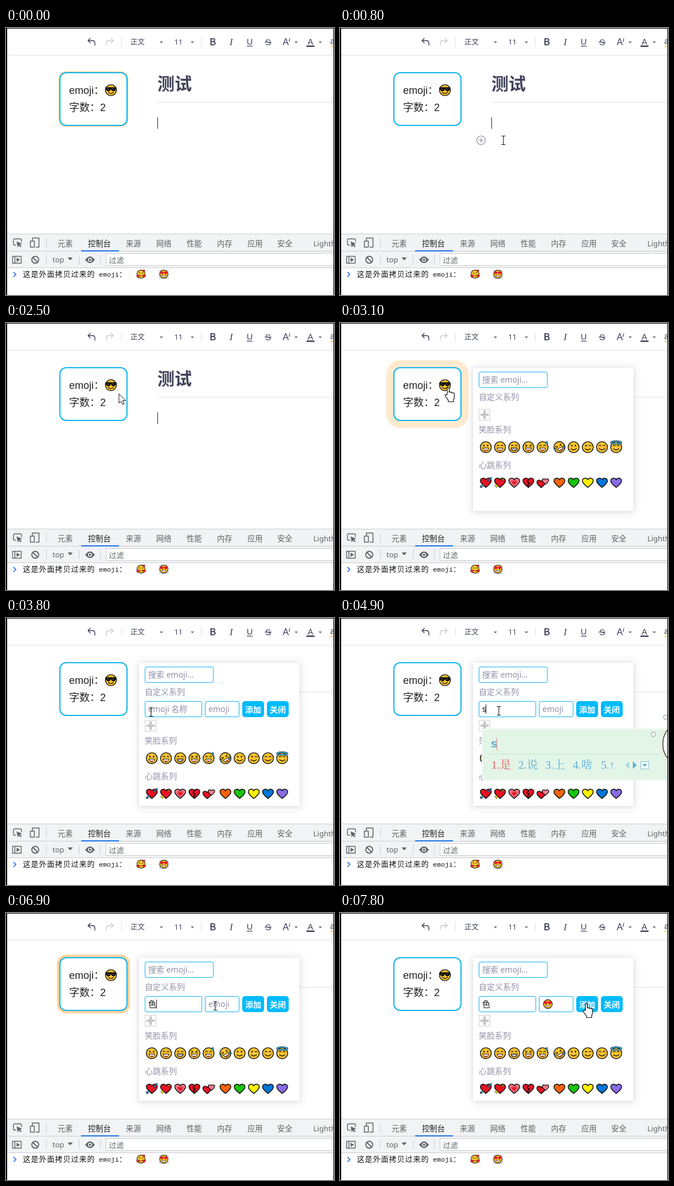
An HTML page for the animation above (8 s loop, 572 by 466 pixels).

```html
<!DOCTYPE html>
<html lang="zh-CN">
<head>
<meta charset="utf-8">
<title>emoji 测试</title>
<style>
html, body { margin: 0; width: 100%; height: 100%; overflow: hidden; background: #fff; }
svg { display: block; width: 572px; height: 466px; }
text { font-family: "Noto Sans", "Noto Sans CJK SC", "Noto Sans CJK", sans-serif; white-space: pre; }
.ar { font-family: "Liberation Sans", "Noto Sans CJK SC", "Noto Sans CJK", sans-serif; }
.mono { font-family: "Liberation Mono", monospace; }
.ser { font-family: "Liberation Serif", "Noto Serif CJK SC", "Noto Sans CJK SC", "Noto Sans CJK", serif; }
.b { font-weight: 700; }
</style>
</head>
<body>
<svg id="stage" viewBox="0 0 572 466"></svg>
<script>
const LOOP = 8000, STEP = 100;
const stage = document.getElementById('stage');

const text = (x, y, size, str, fill = '#222', cls = '', more = '') =>
  `<text x="${x}" y="${y}" font-size="${size}" fill="${fill}" class="${cls}" ${more}>${str}</text>`;
const rect = (x, y, w, h, fill, more = '') =>
  `<rect x="${x}" y="${y}" width="${w}" height="${h}" fill="${fill}" ${more}/>`;
const path = (d, stroke, width = 1.2, fill = 'none') =>
  `<path d="${d}" fill="${fill}" stroke="${stroke}" stroke-width="${width}" stroke-linejoin="round" stroke-linecap="round"/>`;
const dot = (x, y, rx, ry = rx, fill = '#111') =>
  `<ellipse cx="${x}" cy="${y}" rx="${rx}" ry="${ry}" fill="${fill}"/>`;
const use = (id, x, y, s = 1) => `<use href="#${id}" transform="translate(${x} ${y}) scale(${s})"/>`;
const group = (id, body, more = '') => `<g id="${id}" ${more}>${body}</g>`;
const down = (x, y, w, fill) => `<path d="M${x - w} ${y}h${2 * w}l${-w} ${w * 1.1}z" fill="${fill}"/>`;

// Emoji parts, drawn around 0,0
const HEART = 'M0 8.6C-4 5-9.4 1.6-9.4-3C-9.4-8-2.6-9.4 0-4.8C2.6-9.4 9.4-8 9.4-3C9.4 1.6 4 5 0 8.6Z';
const heart = (fill, x = 0, y = 0, s = 1, line = 1.5) =>
  `<g transform="translate(${x} ${y}) scale(${s})">${path(HEART, '#111', line, fill)}</g>`;
const ball = `<circle r="9.6" fill="#ffc52e" stroke="#111" stroke-width="1.4"/>`;
const eyes = dot(-3.2, -2.8, 1.2, 1.7) + dot(3.2, -2.8, 1.2, 1.7);
const arcs = path('M-5.2-2.2q1.7-2.8 3.4 0M1.8-2.2q1.7-2.8 3.4 0', '#111', 1.2);
const squint = path('M-5.4-4.2l3.2 1.700l-3.2 1.700M5.4-4.2l-3.2 1.700l3.2 1.700', '#111', 1.1);
const open = path('M-5 1.500h10q-.6 5-5 5t-5-5z', '#111', 1, '#fff') +
  path('M-2.600 5q2.600-1.600 5.200 0q-2.600 1.600-5.200 0z', '#d8382f', .5, '#d8382f');
const teeth = path('M-5.4 1.400h10.800q-.6 4.800-5.400 4.800t-5.400-4.800z', '#111', 1.1, '#fff') + path('M-4.6 3.7h9.200', '#111', .6);
const smile = path('M-4.8 2.6q4.8 4.4 9.6 0', '#111', 1.2);
const drop = (x, y) => path(`M${x} ${y}q-3.4 4.6 0 5.2q3.4-.6 0-5.2z`, '#111', .7, '#35b3f2');
const blush = dot(-6, 1.6, 1.8, 1.3, '#f58a55') + dot(6, 1.6, 1.8, 1.3, '#f58a55');
const red = '#e81224';

const emoji = {
  grin: ball + eyes + open,
  happy: ball + arcs + open,
  beam: ball + arcs + teeth,
  laugh: ball + squint + open,
  sweat: ball + arcs + open + drop(7.4, -10.5),
  rofl: `<g transform="rotate(-28)">${ball + squint + open}</g>` + drop(-7.4, 1) + drop(7.6, -3),
  mild: ball + eyes + smile,
  wink: ball + dot(-3.2, -2.8, 1.2, 1.7) + path('M1.8-2.4q2-1.6 4 0', '#111', 1.2) + smile,
  shy: ball + blush + arcs + smile,
  halo: ball + arcs + smile + `<ellipse cy="-8" rx="9" ry="2.2" fill="none" stroke="#111" stroke-width="2.8"/>
    <ellipse cy="-8" rx="9" ry="2.2" fill="none" stroke="#39b5ee" stroke-width="1.6"/>`,
  cool: ball + path('M-9-4.6h18l-1 4q-1.2 2.6-4.4 2.2q-2.6-.4-3-3.6h-1.2q-.4 3.2-3 3.6q-3.2.4-4.4-2.2z', '#111', 1, '#111') +
    path('M-6.4-3.2l2 2M2.4-3.2l2 2', '#8a8a8a', .9) + path('M-4.4 4q4.400 3.600 8.800 0', '#111', 1.3),
  adore: ball + arcs + blush + smile + heart(red, -7.4, 5.4, .36, 1) +
    heart(red, 7.4, 5, .38, 1) + heart(red, 6.4, -7.6, .34, 1),
  love: ball + heart(red, -4.4, -2.8, .44, 0) + heart(red, 4.4, -2.8, .44, 0) +
    path('M-4.4 2.600h8.800q-.8 4-4.400 4t-4.400-4z', '#111', .8, '#fff'),
  arrow: heart(red) + path('M-8.600 7.600L-4 3.600M4-3L8.600-7.600', '#111', 2.4) + path('M-8.600 7.600L-4 3.600M4-3L8.600-7.600', '#35b3f2', 1.2) +
    path('M9.600-8.800l-4 .9l3 3zM-9.600 8.600l.4-3.600l2.900 3.200z', '#111', .7, '#35b3f2'),
  spark: heart(red) + path('M-6 2l1.100 2.500l2.500 1.100l-2.500 1.100l-1.100 2.500l-1.100-2.500l-2.500-1.100l2.500-1.100zM5-7.600l.7 1.700l1.700.7l-1.700.7l-.7 1.700l-.7-1.700l-1.700-.7l1.700-.7z', '#111', .5, '#ffd21f'),
  grow: heart('#f4828f') + heart('#ee5265', 0, .2, .68, 0) + heart(red, 0, .4, .36, 0),
  broken: heart(red) + path('M0-5l-2.2 3.6l4 2.4l-3 3.2l1.2 4.2', '#111', 1.7),
  pair: heart(red, -2.4, 2, .8, 1.8) + heart('#f4828f', 5, -2, .6, 2.2),
  orange: heart('#f7630c'), green: heart('#16c60c'), yellow: heart('#fff100'),
  blue: heart('#0078d7'), purple: heart('#886ce4')
};
const faceRow = ['grin', 'happy', 'beam', 'laugh', 'sweat', 'rofl', 'mild', 'wink', 'shy', 'halo'];
const heartRow = ['arrow', 'spark', 'grow', 'broken', 'pair', 'orange', 'green', 'yellow', 'blue', 'purple'];
const row = (names, y) => names.map((n, i) => use(n, 254.3 + i * 24.75 + (i > 4 ? 4.6 : 0), y)).join('');

function toolbar() {
  const ink = '#3c4056', arrows = [271, 325, 506, 548].map(x => down(x, 23.5, 3, '#6d7080')).join('');
  const firm = `stroke="${ink}" stroke-width=".4"`;
  return rect(2, 47, 570, 1, '#e1e2e6') +
    path('M147 18l-4 4l4 4M143.500 22h7.500q4 0 4 4.500v3.500', ink, 1.4) +
    path('M183 18l4 4l-4 4M186.500 22h-7.500q-4 0-4 4.500v3.500', '#c9cad0', 1.4) +
    rect(201, 16, 1, 16, '#dedfe3') + rect(340, 16, 1, 16, '#dedfe3') + arrows +
    text(217, 29, 12.5, '正文', ink) + text(293.5, 29, 12.5, '11', ink) +
    text(355.5, 30, 16, 'B', ink, 'ar', firm) + text(390, 30, 16.5, 'I', ink, 'ser', 'font-style="italic"') +
    text(419.8, 28.5, 14.5, 'U', ink, 'ar') + rect(420, 31, 10, 1.2, ink) +
    text(452, 30, 15.5, 'S', ink, 'ar') + rect(451, 24, 12, 1.2, ink) +
    text(482.5, 30, 16, 'A', ink, 'ar') + text(493, 24, 9, 'i', ink, 'ar b', 'font-style="italic"') +
    text(526, 28.5, 14.5, 'A', ink, 'ar') + rect(524, 30.5, 14, 2.5, ink) +
    text(565.5, 28, 14, 'a', ink, 'ar') + rect(565, 30.5, 7, 3, '#ffd9a8');
}

function devtools() {
  const grey = '#5f6368', line = '#cacdd1';
  const tabs = ['元素', '控制台', '来源', '网络', '性能', '内存', '应用', '安全'];
  const tabX = [90, 143, 209, 262, 315, 368, 421, 473];
  return rect(1, 359, 571, 60, '#f1f3f4') +
    [359, 389, 418].map(y => rect(1, y, 571, 1, line)).join('') +
    path('M17 379h-2q-2 0-2-2v-7q0-2 2-2h10q2 0 2 2v3', grey, 1.4) +
    path('M19 373l8.500 3.400l-3.600 1.400l3 3.200l-1.400 1.300l-3-3.200l-1.700 3z', grey, .6, grey) +
    path('M46 371v-4.500h11.500v16h-5M42.500 372h7v10.500h-7z', grey, 1.5) +
    rect(70, 367, 1, 16, line) +
    tabs.map((s, i) => text(tabX[i], 380.5, 13.3, s, i == 1 ? '#202124' : grey)).join('') +
    text(536, 380.5, 13, 'Lighthouse', grey) + rect(131, 388, 66, 2, '#1a73e8') +
    path('M11.500 398.500h15v12h-15zM15.500 398.500v12', grey, 1.4) + path('M19 401.500l5 3l-5 3z', grey, .6, grey) +
    `<circle cx="51" cy="404.500" r="6" fill="none" stroke="${grey}" stroke-width="1.8"/>` + path('M47 400.500l8 8', grey, 1.8) +
    [70, 127, 164].map(x => rect(x, 396, 1, 16, line)).join('') +
    text(81, 409, 13, 'top', grey) + down(112, 400.5, 4.5, grey) +
    path('M138.500 404.500q8-11 16 0q-8 11-16 0z', grey, 1, grey) + dot(146.5, 404.5, 3.6, 3.6, '#f1f3f4') + dot(146.5, 404.5, 2, 2, grey) +
    rect(174.5, 393.5, 410, 21, '#fff', `stroke="${line}"`) + text(179.5, 409.5, 13, '过滤', grey) +
    path('M13.500 426.500l3.800 3.700l-3.800 3.700', '#367cf1', 1.8) +
    text(29.5, 433.8, 13, '这是外面拷贝过来的', '#111', '', 'letter-spacing="1"') +
    text(162, 433.5, 11.67, 'emoji', '#111', 'mono') + text(197, 433.8, 13, '：', '#111') +
    use('adore', 235.5, 429.5, .74) + rect(267, 422, 17, 16, '#dcdce0', 'id="mark"') + use('love', 275.2, 429.5, .74);
}

const hint = '#9091a8', cyan = '#12b5f0';
const field = (x, y, w) => rect(x + .5, y + .5, w - 1, 27, '#fff', `rx="2.500" stroke="${cyan}"`);
const button = (x, s) => rect(x, 145, 38, 28, '#00bbfd', 'rx="5"') + text(x + 5, 164.5, 14, s, '#fff', 'b');

function panel() {
  const form = field(242, 145, 100) + field(347, 145, 60) + button(412, '添加') + button(455, '关闭') +
    text(248, 164, 14, 'emoji 名称', hint, '', 'id="nameHint"') + text(248, 164, 14, '', '#111', '', 'id="name"') +
    text(353, 164, 14, 'emoji', hint, '', 'id="iconHint"') + group('icon', use('love', 362.5, 159, .8)) +
    rect(0, 151, 1, 16, '#111', 'id="caret"');
  const list = rect(242.5, 150.5, 19, 19, '#fff', 'stroke="#cfcfcf"') +
    rect(245, 158, 14.5, 4, '#c6c6c6') + rect(250, 152.5, 4.5, 15, '#c6c6c6') +
    text(242, 191, 14, '笑脸系列', hint) + row(faceRow, 216.7) +
    text(242, 253, 14, '心跳系列', hint) + row(heartRow, 278.4);
  return rect(219, 66, 306, 276, '#000', 'rx="22" opacity=".012"') +
    `<rect x="232" y="78" width="280" height="250" fill="#fff" style="filter:drop-shadow(0 1px 4px rgba(0,0,0,.16))"/>` +
    field(242, 85, 120) + text(248, 104, 14, '搜索 emoji...', hint) +
    text(242, 134, 14, '自定义系列', hint) + group('form', form) + group('list', list);
}

function ime() {
  const blue = '#5cacd4', xs = [264, 311, 358, 406, 455];
  return rect(249.5, 195, 340, 87, '#e3f5e7', 'rx="5" stroke="#eef8f0" stroke-width="5"') +
    rect(251.5, 197, 340, 83, 'none', 'rx="4" stroke="#d3ebd8"') + rect(258, 237, 300, 1, '#cbe3d2') +
    text(263, 226, 20, '', blue, 'ar b', 'id="typed"') + rect(0, 209, 1, 22, '#e88080', 'id="imeCaret"') +
    xs.map((x, i) => text(x, 263, 19.5, '', i ? blue : '#ea5a62', 'ser', `id="cand${i}"`)).join('') +
    path('M504 251v12l-6-6z', '#a9d3e0', .5, '#a9d3e0') + path('M511 251v12l6-6z', blue, .5, blue) +
    rect(524.5, 250.5, 14, 13, '#eefaf3', `stroke="#8fc4d8"`) + down(531.5, 255, 4, blue) +
    '<ellipse cx="583" cy="220" rx="20" ry="30" fill="#fffdf8" stroke="#6d6158" stroke-width="2"/>' +
    [[546.5, 203], [568, 173]].map(([x, y]) => `<circle cx="${x}" cy="${y}" r="3.700" fill="#fff" stroke="#a5b5a8" stroke-width="1.500"/>`).join('');
}

const hand = 'M-2 12V1.500a1.700 1.700 0 0 1 3.400 0V8a1.700 1.700 0 0 1 3.200.6a1.700 1.700 0 0 1 3 .8a1.600 1.600 0 0 1 2.800 1V16c0 3-1 4-1.500 5v3.500h-9V22c-1-2-4-5-5.500-8c-.8-1.800 1-2.800 2.200-1.600z';
const cursors = group('hand', path(hand, '#111', 1.2, '#fff')) +
  group('arrowCur', path('M0 0v16l3.800-3.600l2.700 6l2.600-1.200l-2.700-5.800h5.200z', '#111', 1, '#fff')) +
  group('bar', path('M-3-7.500h2q1 0 1 1q0-1 1-1h2M0-6.500v13M-3 7.500h2q1 0 1-1q0 1 1 1h2', '#111', 1.1));

stage.innerHTML =
  '<defs>' + Object.entries(emoji).map(([id, body]) => group(id, body)).join('') + '</defs>' +
  rect(0, 0, 572, 466, '#fff') + toolbar() +
  text(264, 107.5, 30, '测试', '#40435a', 'b') + rect(264, 129, 308, 1, '#e2e3e6') + rect(264, 156, 1, 20, '#222') +
  group('add', '<circle cx="246" cy="196" r="7.500" fill="#fff" stroke="#8a8c96" stroke-width="1.200"/>' + path('M242 196h8M246 192v8', '#8a8c96')) +
  rect(0, 0, 0, 0, '#ffc880', 'id="ring"') +
  rect(94, 78, 117, 92, '#fff', `rx="11" stroke="${cyan}" stroke-width="2"`) +
  text(110, 115, 18, 'emoji：', '#222', 'ar') + use('cool', 183, 108.5) + text(110, 145, 18, '字数：2', '#222', 'ar') +
  devtools() + group('panel', panel()) + group('ime', ime()) + group('cursor', cursors) +
  rect(0, 0, 572, 1, '#000') + rect(0, 0, 2, 466, '#000') + rect(571, 0, 1, 466, '#000');

const $ = id => document.getElementById(id);
const show = (id, on) => $(id).setAttribute('display', on ? 'inline' : 'none');
const within = (t, a, b) => t >= a && t < b;

// Pulse starts; each one spreads 20 px while fading out
const pulses = [-40, 1290, 2670, 4000, 5440, 6750], PULSE = 700;

// Pointer: time, x, y, shape from then on
const track = [
  [0, 430, 405, ''], [100, 422, 400, 'arrowCur'], [300, 340, 270, 'bar'], [600, 285, 196, 'bar'],
  [800, 285, 196, 'bar'], [1100, 290, 350, 'arrowCur'], [1300, 285, 430, 'bar'], [1500, 275, 430, 'bar'],
  [1700, 275, 430, 'bar'], [1900, 298, 393, 'arrowCur'], [2100, 300, 290, 'bar'], [2400, 205, 135, 'arrowCur'],
  [2600, 189, 113, 'hand'], [3100, 189, 113, 'hand'], [3200, 222, 138, 'arrowCur'], [3300, 250, 158, 'hand'],
  [3400, 250, 158, 'bar'], [3600, 253, 164, 'bar'], [3800, 253, 164, 'bar'], [4200, 277, 162, 'bar'],
  [6400, 277, 162, 'bar'], [6900, 365, 162, 'bar'], [7400, 365, 162, 'bar'], [7700, 430, 158, 'hand'], [8000, 430, 158, 'hand']
];

function pulse(t) {
  const p = (t - pulses.filter(s => s <= t).pop()) / PULSE;
  show('ring', p < 1);
  if (p >= 1) return;
  const r = 20 * p, box = { x: 93 - r, y: 77 - r, width: 119 + 2 * r, height: 94 + 2 * r, rx: 12 + r, opacity: 1 - p };
  for (const k in box) $('ring').setAttribute(k, box[k]);
}

function point(t) {
  const i = track.findIndex(k => k[0] > t), a = track[i - 1], b = track[i];
  const u = (t - a[0]) / (b[0] - a[0]);
  $('cursor').setAttribute('transform', `translate(${a[1] + (b[1] - a[1]) * u} ${a[2] + (b[2] - a[2]) * u})`);
  ['hand', 'arrowCur', 'bar'].forEach(id => show(id, id == a[3]));
}

function draw(t) {
  pulse(t);
  point(t);
  show('add', within(t, 500, 2400));
  $('mark').setAttribute('fill', within(t, 1400, 2300) ? '#a9cdf5' : '#dcdce0');
  show('panel', t >= 2600);
  show('form', t >= 3400);
  $('list').setAttribute('transform', `translate(0 ${t >= 3400 ? 28 : 0})`);

  const name = t < 4700 ? '' : t < 5100 ? 's' : t < 5400 ? 'se' : '色';
  $('name').textContent = name;
  show('nameHint', !name);
  show('icon', t >= 7300);
  show('iconHint', t < 7300);
  const second = t >= 7000;
  show('caret', within(t, 4200, 7600));
  const width = { '': 0, s: 6, se: 14, '色': 14 }[name];
  $('caret').setAttribute('x', second ? (t < 7300 ? 353 : 372) : 248 + width);

  show('ime', within(t, 4700, 5400));
  const more = t >= 5100;
  $('typed').textContent = more ? 'se' : 's';
  $('imeCaret').setAttribute('x', more ? 285 : 273);
  [...(more ? '色涩瑟塞↑' : '是说上啥↑')].forEach((c, i) => $('cand' + i).textContent = `${i + 1}.${c}`);
}

const start = performance.now();
function tick() {
  const t = (performance.now() - start) % LOOP;
  draw(Math.floor(t / STEP) * STEP);
  requestAnimationFrame(tick);
}
tick();
</script>
</body>
</html>
```
